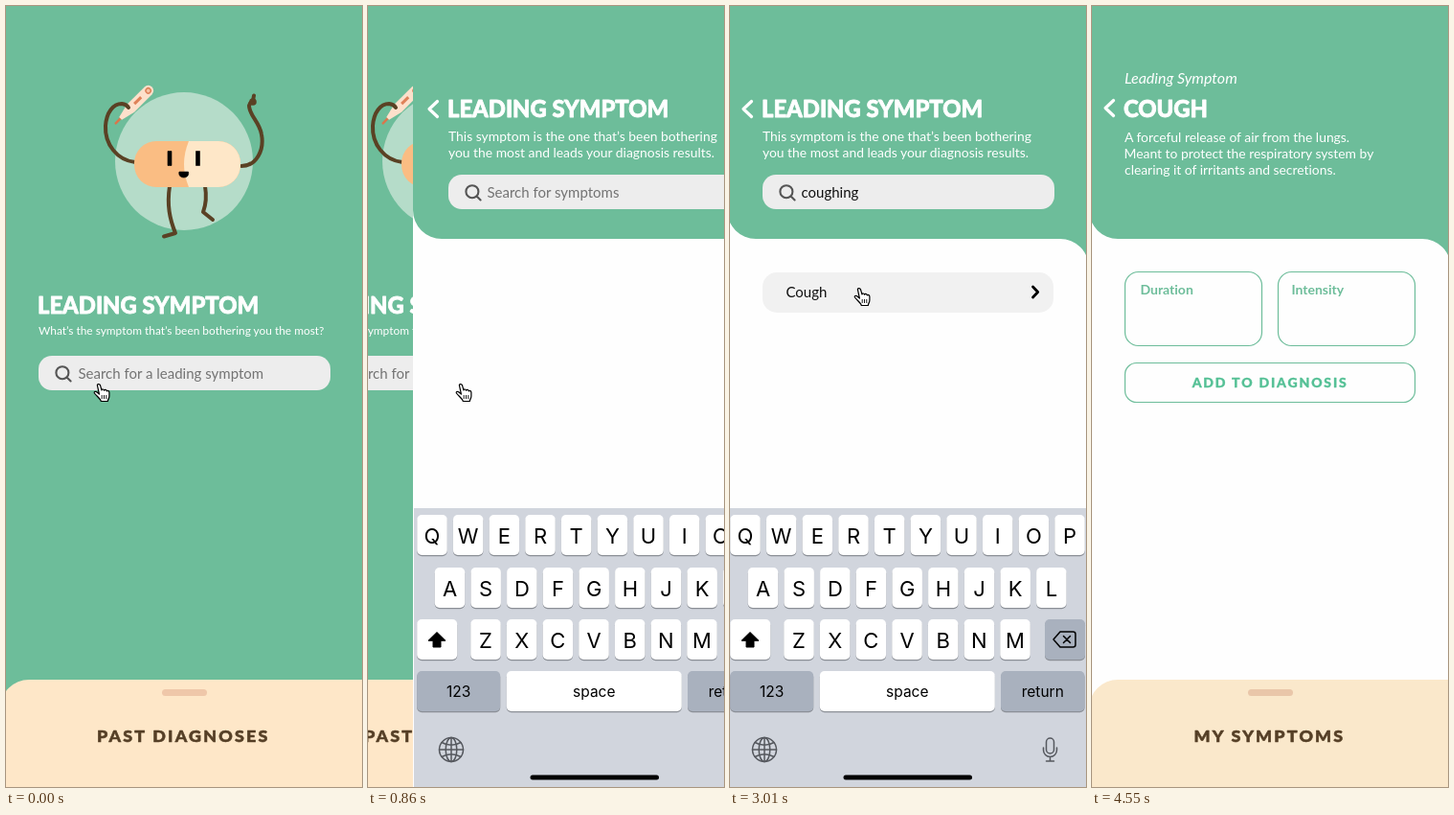
These frames come from a looping animation (372x815 px, 4730 ms). An HTML page:

```html
<!DOCTYPE html>
<html lang="en">
<head>
<meta charset="utf-8">
<title>Symptom search</title>
<style>
  html, body { margin: 0; height: 100%; overflow: hidden; background: #6dbd9a; }
  svg { display: block; width: 100%; height: 100%; font-family: Lato, sans-serif; font-variant-ligatures: none; }
  .title, .sheet, .button { font-weight: 800; stroke-linejoin: round; }
  .title { font-size: 23.8px; fill: #fff; stroke: #fff; stroke-width: .8; }
  .sheet { font-size: 17.9px; letter-spacing: 2.2px; fill: #553f26; stroke: #553f26; stroke-width: .6; }
  .button { font-size: 14px; letter-spacing: 1.85px; fill: #54c095; stroke: #54c095; stroke-width: .4; }
  .note { font-size: 13.88px; fill: #fff; }
  .hint { font-size: 11.9px; fill: #fff; }
  .name { font-size: 16px; font-style: italic; fill: #fff; }
  .field { font-size: 15px; fill: #737373; }
  .dark { fill: #111; }
  .label { font-size: 14px; font-weight: 700; fill: #6dbd9a; }
  .line { fill: none; stroke-linecap: round; stroke-linejoin: round; }
  .limb { stroke: #5a4124; stroke-width: 4; }
  .back { stroke: #fff; stroke-width: 3.2; }
  .icon { stroke: #55585e; stroke-width: 1.5; }
  .lens { stroke: #555; stroke-width: 2.1; }
  .card { fill: none; stroke: #6dbd9a; stroke-width: 1.2; }
  #keys { font-family: Inter, sans-serif; font-size: 22px; text-anchor: middle; fill: #000; }
  #keys .small { font-size: 15.5px; }
</style>
</head>
<body>
<svg viewBox="0 0 372 815">
  <defs>
    <path id="header" fill="#6dbd9a" d="M-3 0H375V273A30 30 0 0 0 345 243H27A30 30 0 0 1-3 213Z"/>
    <path id="tray" d="M-3 816V733A30 30 0 0 1 27 703H376V816Z"/>
    <rect id="grip" x="163" y="713" width="47" height="7" rx="3.5"/>
    <g id="search">
      <rect x="34" width="305" height="36" rx="14" fill="#ededed"/>
      <path class="line lens" d="M65.400 17.700a6.500 6.500 0 1 1-13 0a6.500 6.500 0 1 1 13 0M63.600 22.400l4 4"/>
    </g>
  </defs>

  <g id="home">
    <rect width="450" height="815" fill="#6dbd9a"/>
    <circle cx="186" cy="162" r="72" fill="#b5dcc9"/>
    <g class="line limb">
      <path d="M171 188C168 208 171 222 177 237L165 240.500M208 188C210 200 209 207 206 215L216 223"/>
      <path d="M246 167C262 167 270 150 267 134C265 121 254 114 254 104Q255 100 258 99L259 93.500"/>
      <circle cx="258" cy="100" r="1.800"/>
    </g>
    <g transform="translate(114.700 122.300) rotate(-45)">
      <path d="M0 0H9" stroke="#d9774c" stroke-width="2.500" stroke-linecap="round"/>
      <path d="M7-2L22-5.500H48a5.500 5.500 0 0 1 0 11H22L7 2Z" fill="#fde0cb"/>
      <path d="M28-.5H38" stroke="#df8259" stroke-width="3"/>
      <circle cx="48" r="2.600" fill="#f7c3a4" stroke="#df8259" stroke-width="1.500"/>
    </g>
    <path class="line limb" d="M135 163C116 161 103 144 104 125C105 111 112 102 121 102Q126 102.500 128 106"/>
    <rect x="134" y="141" width="111" height="48" rx="23" fill="#fabd83"/>
    <path d="M191 141H222a23 23 0 0 1 23 23v2a23 23 0 0 1-23 23H191Q181 165 191 141Z" fill="#fee7c8"/>
    <path d="M169 151.500h4v15h-4zM198.500 151.500h4v15h-4zM181 173h9.500c1 3-1 6-4.700 6s-5.800-3-4.800-6z"
          stroke="#000" stroke-width=".6" stroke-linejoin="round"/>
    <text class="title" x="33" y="321">LEADING SYMPTOM</text>
    <text class="hint" x="34" y="343">What’s the symptom that’s been bothering you the most?</text>
    <use href="#search" y="365"/>
    <text class="field" x="75.500" y="389">Search for a leading symptom</text>
    <use href="#tray" x="-3" fill="#fee7c8"/>
    <use href="#grip" fill="#efc7a9"/>
    <text class="sheet" x="95" y="768">PAST DIAGNOSES</text>
  </g>

  <g id="find">
    <rect x="-3" width="378" height="815" fill="#fefefe"/>
    <use href="#header"/>
    <path class="line back" d="M22.500 99.500L14 107.500L22.500 115.500"/>
    <text class="title" x="33" y="116">LEADING SYMPTOM</text>
    <text class="note" x="34" y="141">This symptom is the one that’s been bothering</text>
    <text class="note" x="34" y="158">you the most and leads your diagnosis results.</text>
    <use href="#search" y="176"/>
    <text class="field" id="query" x="74.500" y="199.500"></text>
    <g id="row">
      <rect x="34" y="278" width="304" height="42" rx="15" fill="#f1f1f1"/>
      <text class="field dark" x="58.500" y="304">Cough</text>
      <path class="line" stroke="#000" stroke-width="2.800" d="M316.500 293L321.700 298.500L316.500 304"/>
    </g>
    <g id="keys"></g>
  </g>

  <g id="detail">
    <rect x="-3" width="378" height="815" fill="#fefefe"/>
    <use href="#header"/>
    <path class="line back" d="M22.500 98.500L14 106.500L22.500 114.500"/>
    <text class="name" x="34" y="81">Leading Symptom</text>
    <text class="title" x="33" y="115.500">COUGH</text>
    <text class="note" x="34" y="142">A forceful release of air from the lungs.</text>
    <text class="note" x="33.500" y="159">Meant to protect the respiratory system by</text>
    <text class="note" x="34" y="176">clearing it of irritants and secretions.</text>
    <rect class="card" x="34.500" y="277.500" width="143" height="77" rx="14"/>
    <rect class="card" x="194.500" y="277.500" width="143" height="77" rx="14"/>
    <rect class="card" x="34.500" y="372.500" width="303" height="41" rx="12"/>
    <text class="label" x="50.500" y="301">Duration</text>
    <text class="label" x="208.500" y="301">Intensity</text>
    <text class="button" x="104.700" y="398">ADD TO DIAGNOSIS</text>
    <use href="#tray" fill="#fae8cb"/>
    <use href="#grip" fill="#e9c6a9"/>
    <text class="sheet" x="106.500" y="768">MY SYMPTOMS</text>
  </g>

  <g id="cursor">
    <g id="hand" stroke="#000" stroke-width="1.200" stroke-linejoin="round">
      <path fill="#fff" d="M-1.500 1.200C-2.200-.6 .8-1.200 1.500 .8L3 6C3 4.600 5.400 4.600 5.600 6.200C6 5 8 5.200 8.300 6.900C9 6 10.800 6.500 10.900 8.300V12C11 14.500 9.500 15 9.300 17.500H2.300C2 15-3 11.500-4.600 9C-5.300 7.500-3.400 6.800-2 8L.4 10Z"/>
      <path d="M3.200 11v4M5.500 11v4M7.800 11v4" stroke-width=".9"/>
    </g>
    <path id="arrow" stroke="#fff" d="M0 0V14.500L3.400 11.400L5.600 16.500L8 15.500L5.800 10.500H10.500Z"/>
  </g>
</svg>
<script>
const LOOP = 4730, WIDTH = 375, PARALLAX = 0.306, TYPED = 2300;
const $ = id => document.getElementById(id);

function key(x, y, w, text = '', fill = '#fff', cls = '') {
  const box = (dy, color) => `<rect x="${x}" y="${y + dy}" width="${w}" height="42" rx="5" fill="${color}"/>`;
  return box(1.2, '#8b8f96') + box(0, fill) +
    `<text class="${cls}" x="${x + w / 2}" y="${y + (cls ? 26.5 : 29.5)}">${text}</text>`;
}

function keyboard() {
  const gray = '#a9b1be';
  const rows = [['QWERTYUIOP', 17, 531], ['ASDFGHJKL', 35.5, 586], ['ZXCVBNM', 73, 640]];
  let out = '<rect x="-2" y="524" width="378" height="291" fill="#d1d5dd"/>';
  for (const [letters, x, y] of rows)
    [...letters].forEach((c, i) => out += key(x - 15.75 + i * 37.67, y, 31.5, c));
  out += key(1.2, 640, 42) + key(330, 640, 42, '', gray);
  out += key(1.2, 694, 87, '123', gray, 'small') + key(94.8, 694, 183, 'space', '#fff', 'small') +
    key(284, 694, 87.5, 'return', gray, 'small');
  out += '<path d="M22 653.500L31 662.300H26V669H18V662.300H13Z" stroke="#000" stroke-linejoin="round"/>';
  out += `<g class="line icon">
    <path stroke="#000" d="M346 653H359.500a2.500 2.500 0 0 1 2.500 2.500V666.500a2.500 2.500 0 0 1-2.500 2.500H346L339 661ZM349.500 657.500l7 7m0-7l-7 7"/>
    <circle cx="37" cy="776" r="12.500"/><ellipse cx="37" cy="776" rx="5.800" ry="12.500"/>
    <path d="M37 763.500v25M24.500 776h25M27 768.500Q37 774 47 768.500M27 783.500Q37 778 47 783.500"/>
    <rect x="331.500" y="764" width="8" height="16" rx="4"/>
    <path d="M328.500 774v2.500a7 7 0 0 0 14 0V774M335.500 783.500V788M331.500 788h8"/></g>`;
  return out + '<rect x="119.500" y="802.500" width="134.500" height="5" rx="2.500"/>';
}
$('keys').innerHTML = keyboard();

// Remaining distance of a screen that springs in from the right
function gap(t, start, rate) {
  const x = Math.max(0, t - start) * rate / 1000;
  const d = WIDTH * (1 + x) * Math.exp(-x);
  return d < 6 ? 0 : Math.round(d);
}

// start, end, then from, bend and to points
const moves = [
  [1240, 1660, 97, 395, 68, 285, 89, 183],
  [1870, 2070, 89, 183, 99, 185, 107, 191],
  [2630, 2830, 107, 191, 118, 245, 135, 295],
  [3630, 4090, 135, 295, 200, 490, 286, 684],
  [4170, 4550, 286, 684, 318, 745, 336, 822]
];

function pointer(t) {
  const [a, b, x0, y0, x1, y1, x2, y2] = moves.findLast(m => t >= m[0]) || moves[0];
  const u = Math.min(1, Math.max(0, (t - a) / (b - a)));
  const p = u * (1.2 - 0.2 * u), q = 1 - p;
  const mix = (m, n, o) => q * q * m + 2 * q * p * n + p * p * o;
  return [mix(x0, x1, x2), mix(y0, y1, y2)];
}

const shift = (id, x, y = 0) => $(id).setAttribute('transform', `translate(${x} ${y})`);
const show = (id, on) => $(id).setAttribute('display', on ? 'inline' : 'none');
const behind = d => Math.round((d - WIDTH) * PARALLAX);

function draw(t) {
  const first = gap(t, 627.4, 15.1), second = gap(t, 3246.3, 20.5);
  shift('home', behind(first));
  shift('find', first + behind(second));
  shift('detail', second);

  const typed = t >= TYPED;
  $('query').textContent = typed ? 'coughing' : 'Search for symptoms';
  $('query').classList.toggle('dark', typed);
  show('row', typed);
  shift('keys', typed ? -1 : 0);

  const [x, y] = pointer(t);
  const hot = t < 1240 || y < 212 || (typed && y > 277 && y < 414);
  shift('cursor', x, y);
  show('hand', hot);
  show('arrow', !hot);
}

let origin;
function tick(now) {
  origin ??= now;
  draw((now - origin) % LOOP);
  requestAnimationFrame(tick);
}
draw(0);
requestAnimationFrame(tick);
</script>
</body>
</html>
```
